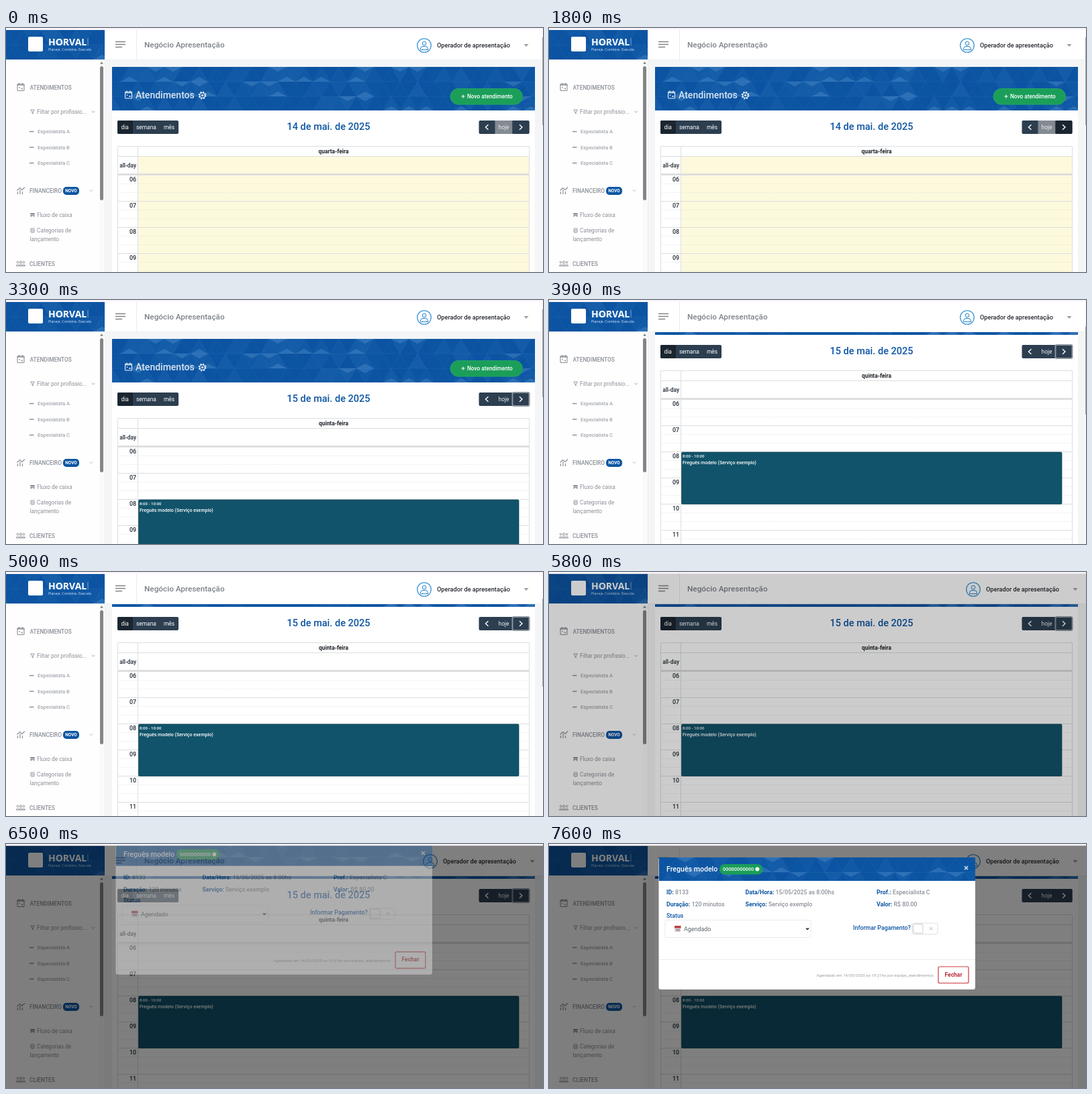
Recreate the animation shown at these times as an HTML page. Size 800 by 364 pixels, loop 8.3 s.

```html
<!DOCTYPE html>
<html lang="pt-BR">
<head>
<meta charset="utf-8">
<title>Agenda</title>
<style>
html, body { margin: 0; width: 100%; height: 100%; overflow: hidden; background: #fff; }
#stage { display: block; width: 800px; height: 364px; font-family: Roboto, sans-serif; }
text { white-space: pre; }
</style>
</head>
<body>
<svg id="stage" viewBox="0 0 800 364"></svg>
<script>
const BLUE = '#0d56a4', GREY = '#8b9098', NAVY = '#2c3e50', DARK = '#1a252f', GREEN = '#1b9e59';
const LOOP = 8300;

const rect = (x, y, w, h, fill, extra = '') =>
  `<rect x="${x}" y="${y}" width="${w}" height="${h}" fill="${fill}" ${extra}/>`;
const text = (x, y, size, content, fill = GREY, weight = 400, anchor = 'start') =>
  `<text x="${x}" y="${y}" font-size="${size}" fill="${fill}" font-weight="${weight}" text-anchor="${anchor}">${content}</text>`;
const line = (d, color, width = 1, extra = '') =>
  `<path d="${d}" fill="none" stroke="${color}" stroke-width="${width}" ${extra}/>`;
const shape = (d, fill) => `<path d="${d}" fill="${fill}"/>`;
const circle = (x, y, r, fill, extra = '') => `<circle cx="${x}" cy="${y}" r="${r}" fill="${fill}" ${extra}/>`;
const group = (id, content) => `<g id="${id}">${content}</g>`;
const chevron = (x, y, dx, dy, color, width = 1) =>
  line(dx ? `M${x - dx} ${y - dy}L${x + dx} ${y}L${x - dx} ${y + dy}` : `M${x - dy} ${y - dy / 2}l${dy} ${dy}l${dy} ${-dy}`, color, width);

function random(seed) {
  return () => (seed = (seed * 16807) % 2147483647) / 2147483647;
}

// Blue panel with a faint triangle lattice and a few brighter facets
function mosaic(x, y, w, h, seed) {
  const next = random(seed), side = 26, rowHeight = 22;
  let out = rect(0, 0, w, h, BLUE);
  for (let row = 0; row * rowHeight < h; row++) {
    for (let col = -1; col * side / 2 < w; col++) {
      const left = col * side / 2, top = row * rowHeight, up = (row + col) & 1;
      const a = top + (up ? rowHeight : 0), b = top + (up ? 0 : rowHeight);
      const middle = left + side / 2, center = (2 * a + b) / 3, tone = next();
      const alpha = (0.02 + next() * 0.05).toFixed(3);
      out += `<path d="M${left} ${a}h${side}L${middle} ${b}z" fill="${tone < 0.5 ? '#003a7c' : '#8fc3ee'}" fill-opacity="${alpha}" stroke="#75afe0" stroke-opacity=".08" stroke-width=".6"/>`;
      if (tone > 0.72) out += `<path d="M${left} ${a}h${side}L${middle} ${center}z" fill="#8fc3ee" fill-opacity=".2"/>`;
    }
  }
  return `<svg x="${x}" y="${y}" width="${w}" height="${h}">${out}</svg>`;
}

const calendarIcon = (x, y, color) =>
  rect(x + 0.5, y + 1.5, 10, 10, 'none', `rx="1" stroke="${color}" stroke-width="1.1"`) +
  line(`M${x} ${y + 3.2}h11M${x + 3} ${y}v3M${x + 8} ${y}v3`, color, 1.2) +
  rect(x + 2.7, y + 6, 1.5, 1.5, color) + rect(x + 6.5, y + 7.5, 1.8, 2, color);

function sidebar() {
  const people = ['A', 'B', 'C'].map((letter, i) => {
    const y = 157 + i * 23.5;
    return line(`M35 ${y - 2.5}h6.5`, GREY, 1.5) + text(47, y, 7.7, 'Especialista ' + letter);
  }).join('');
  return rect(0, 47, 148, 317, '#fefefe') + rect(139, 47, 8, 317, '#fafafa') +
    line('M147.5 47V364', '#eceef0') +
    shape('M140 53.5l2.5-3l2.5 3z', '#777') + rect(140, 57, 5, 200, '#858585', 'rx="2.5"') +
    mosaic(0, 3, 147, 44, 77) +
    rect(33, 13, 22, 22, '#fff', 'rx="2"') +
    `<g font-family="'Open Sans', sans-serif">${text(63, 26, 14, 'HORVAL<tspan font-weight="300" fill="#a9cdf0">I</tspan>', '#fff', 700)}
     ${text(63, 34, 5.2, 'Planeje. Combine. Execute.', '#dce9f6')}</g>` +
    calendarIcon(16.5, 82, GREY) + text(35.5, 92, 8.4, 'ATENDIMENTOS', GREY, 500) +
    line('M36.8 122h5.6l-2.2 3v3l-1.2-1v-2z', GREY, 0.9) + text(46, 128, 8.4, 'Filtar por profissio...') +
    chevron(130, 125, 0, 2.3, '#a4a8ae') + people +
    line('M17.5 248v-4M21 248v-7M24.5 248v-4M16.5 242.5l4-4l3.5 3l4-4', GREY, 1.2) +
    text(35, 245.5, 8.4, 'FINANCEIRO', GREY, 500) +
    rect(85, 237, 24, 12, BLUE, 'rx="5"') + text(97, 245.4, 6.4, 'NOVO', '#fff', 700, 'middle') +
    chevron(127, 242.5, 0, 2.3, '#b4b8be') +
    shape('M36.5 276h6l.7 2h-7.4zM36.5 278.5h6v3h-2v-1.5h-2v1.5h-2z', GREY) + text(46, 281.5, 8.3, 'Fluxo de caixa') +
    rect(37, 299, 5, 6, 'none', `stroke="${GREY}" rx="1"`) + line('M38 301.5h3M38 303h3', GREY, 0.7) +
    text(46, 305, 8.3, 'Categorias de') + text(35.5, 318, 8.3, 'lançamento') +
    [[17.5, 1.3], [22, 1.7], [26.5, 1.3]].map(([x, r]) =>
      circle(x, 349.5, r, 'none', `stroke="${GREY}"`) + line(`M${x - 2} 355v-1q2-2.5 4 0v1z`, GREY)).join('') +
    text(35, 354.5, 8.4, 'CLIENTES', GREY, 500);
}

function navbar() {
  return rect(147, 2, 653, 45, '#fff') + line('M147 47.5h653', '#eceef0') +
    line('M163 20.5h15M163 24.5h15M163 28.5h10', '#858585', 1.4) +
    line('M194.5 3V47', '#e8eaec') +
    text(206, 29, 11.75, 'Negócio Apresentação', '#7d828a', 500) +
    group('account',
      circle(623, 26, 10.3, '#fafdff', 'stroke="#2a87cb" stroke-width="1.1"') +
      circle(623, 23, 2.8, 'none', 'stroke="#2a87cb"') +
      line('M617.5 32.5v-1.5q0-3.5 3.5-3.5h4q3.5 0 3.5 3.5v1.5z', '#2a87cb') +
      text(642, 28.5, 9.2, 'Operador de apresentação', '#24282e', 500) +
      shape('M771.5 24h7l-3.5 4z', '#a0a0a0'));
}

function grid() {
  let out = group('today', rect(197, 192, 582, 25, '#fdf9dc') + rect(197, 219, 582, 320, '#fdf9dc'));
  for (let i = 0; i < 24; i++) {
    const y = 219.5 + i * 13, isHour = i % 3 === 0;
    out += line(`M166 ${y}H779`, isHour ? '#dcdedf' : '#e2e3e3', isHour ? 1 : 0.8, isHour ? '' : 'stroke-dasharray="1 1"');
    if (isHour) out += text(194, y + 9.5, 8.9, String(6 + i / 3).padStart(2, '0'), '#222b35', 500, 'end');
  }
  return out + line('M166.5 540V176.5H779.5V540M166 191.5H779M196.5 176V540', '#dcdedf') +
    rect(166, 217, 613, 3, '#dedfdf') +
    text(194, 207.5, 8.4, 'all-day', '#222b35', 500, 'end') +
    `<text id="weekday" x="488" y="187" font-size="8.4" font-weight="700" fill="#1d2329" text-anchor="middle"></text>` +
    group('event', rect(197.5, 298, 566.5, 77.5, '#11536a', 'rx="1.5" stroke="#0c4257" stroke-width=".7"') +
      text(199, 305.5, 6.1, '8:00 - 10:00', '#fff', 500) +
      text(199, 315.5, 7.05, 'Freguês modelo (Serviço exemplo)', '#fff', 500));
}

function page() {
  return rect(158, 58, 630, 500, '#fff', 'rx="3"') + mosaic(158, 58, 630, 65, 4242) +
    calendarIcon(177, 93.5, '#e4edf6') + text(193, 105, 14, 'Atendimentos', '#d8e4f0', 500) +
    circle(292.5, 100.5, 5, 'none', 'stroke="#fff" stroke-width="1.6" stroke-dasharray="2.2 1.73"') +
    circle(292.5, 100.5, 3.8, 'none', 'stroke="#fff" stroke-width="1.1"') + circle(292.5, 100.5, 1.4, '#fff') +
    rect(662, 90.5, 107.5, 23.5, GREEN, 'rx="11.7" stroke="#22a761"') +
    line('M678.5 102h5M681 99.5v5', '#fff', 1.1) + text(687, 105, 8.25, 'Novo atendimento', '#fff', 500) +
    rect(166, 138, 91, 20, NAVY, 'rx="2"') + rect(166, 138, 23, 20, DARK, 'rx="2"') +
    text(171.5, 150.5, 8.4, 'dia', '#fff') + text(194, 150.5, 8.4, 'semana', '#fff') + text(235, 150.5, 8.4, 'mês', '#fff') +
    `<text id="date" x="480.5" y="152" font-size="14.5" font-weight="500" fill="${BLUE}" text-anchor="middle"></text>` +
    rect(704.5, 138, 75, 20, NAVY, 'rx="2"') +
    `<rect id="todayButton" x="728.5" y="138" width="26" height="20"/>` +
    `<rect id="nextButton" x="754.5" y="138" width="25" height="20" rx="2"/>` +
    rect(754.5, 138, 25, 20, 'none', 'id="focus" stroke="#8b949d" stroke-width="2" rx="2"') +
    chevron(716.5, 148, -2, 3.7, '#fff', 1.4) + chevron(767, 148, 2, 3.7, '#fff', 1.4) +
    text(741.5, 150.5, 8.4, 'hoje', '#eef0f2', 400, 'middle') + grid();
}

function modal() {
  const field = (x, y, label, value) =>
    text(x, y, 8.8, `<tspan fill="${BLUE}" font-weight="700">${label}</tspan> ${value}`, GREY, 500);
  return rect(163.5, 20, 471.5, 197, '#fff', 'rx="3"') + mosaic(164, 20, 471, 35, 911) +
    text(175, 41, 10.6, 'Freguês modelo', '#fff', 500) +
    rect(254, 30, 64.5, 15.5, GREEN, 'rx="7.7"') + text(259, 40.3, 7.4, '00000000000', '#fff', 500) +
    circle(310.3, 37.6, 3, '#fff') +
    line('M619 33.2l5 5m0-5l-5 5', '#bcd3e9', 1.7) +
    field(175, 75, 'ID:', '8133') + field(292.5, 75, 'Data/Hora:', '15/05/2025 as 8:00hs') +
    field(488, 75, 'Prof.:', 'Especialista C') +
    field(175, 93, 'Duração:', '120 minutos') + field(292.5, 93, 'Serviço:', 'Serviço exemplo') +
    field(488, 93, 'Valor:', 'R$ 80.00') +
    text(175, 109.5, 8.8, 'Status', BLUE, 500) +
    rect(173, 113.5, 217, 26, '#fff', 'rx="2" stroke="#e9ebee"') +
    rect(187, 122, 9.5, 9, '#d8dde2', 'rx="1"') + rect(187, 122, 9.5, 3.5, '#b9413f') +
    line('M189 127.5h6M189 129.3h6', '#8d5b5b', 0.8) +
    text(201, 130, 8.9, 'Agendado', '#5c626a') + chevron(385, 126.5, 0, 2, '#222', 1.4) +
    text(453, 127.5, 8.8, 'Informar Pagamento?', BLUE, 500) +
    rect(541.5, 118, 37.5, 16.5, '#fff', 'rx="2" stroke="#dcdfe2"') +
    rect(543, 119.5, 14, 13.5, '#fff', 'rx="1" stroke="#c9cdd1"') +
    line('M567 124l4.5 4.5m0-4.5l-4.5 4.5', '#b5babf') +
    line('M164 172.5H635', '#e9ebee') +
    text(573, 198, 6.15, 'Agendado em 14/05/2025 as 19:21hs por equipe_atendimentos', '#989ca3', 400, 'end') +
    rect(580, 183, 45, 24.5, '#fff', 'rx="2" stroke="#cb3a43" stroke-width="1.2"') +
    text(602.5, 197.7, 8.5, 'Fechar', '#b92d37', 700, 'middle');
}

const stage = document.getElementById('stage');
stage.innerHTML = rect(0, 0, 800, 364, '#f3f5f7') + group('page', page()) + navbar() + sidebar() +
  group('scrollbar', rect(798, 2, 2, 362, '#f8f8f8') + rect(799, 14, 1, 131, '#a2a2a2', 'id="thumb"')) +
  rect(0, 2, 800, 362, '#000', 'id="dim"') + group('modal', modal()) +
  rect(0, 0, 800, 2.5, '#fbf5fa');

const el = id => document.getElementById(id);
const set = (id, name, value) => el(id).setAttribute(name, value);
const show = (id, visible) => set(id, 'visibility', visible ? 'visible' : 'hidden');
const clamp = v => Math.max(0, Math.min(1, v));

function render(time) {
  const t = Math.floor((time % LOOP) / 100) * 100;
  const nextDay = t >= 1900;

  el('date').textContent = `${nextDay ? 15 : 14} de mai. de 2025`;
  el('weekday').textContent = nextDay ? 'quinta-feira' : 'quarta-feira';
  show('today', !nextDay);
  show('event', t >= 2800);
  set('todayButton', 'fill', nextDay ? NAVY : '#838a92');
  set('nextButton', 'fill', t >= 1000 && t < 2800 ? DARK : NAVY);
  show('focus', nextDay && t < 6600);

  const s = clamp((t - 3500) / 400), scroll = s * s * (3 - 2 * s);
  set('page', 'transform', `translate(0 ${-71 * scroll})`);
  set('thumb', 'y', 14 + 26 * scroll);

  const locked = t >= 5700;
  show('scrollbar', !locked);
  set('account', 'transform', `translate(${locked ? 9 : 0} 0)`);
  set('dim', 'opacity', Math.min(0.5, clamp((t - 5700) / 500)));

  const p = clamp((t - 6400) / 300);
  set('modal', 'opacity', clamp((p - 0.15) * 2));
  set('modal', 'transform', `translate(0 ${-50 * (1 - p) ** 2})`);
}

const start = performance.now();
(function frame() {
  render(performance.now() - start);
  requestAnimationFrame(frame);
})();
</script>
</body>
</html>
```
